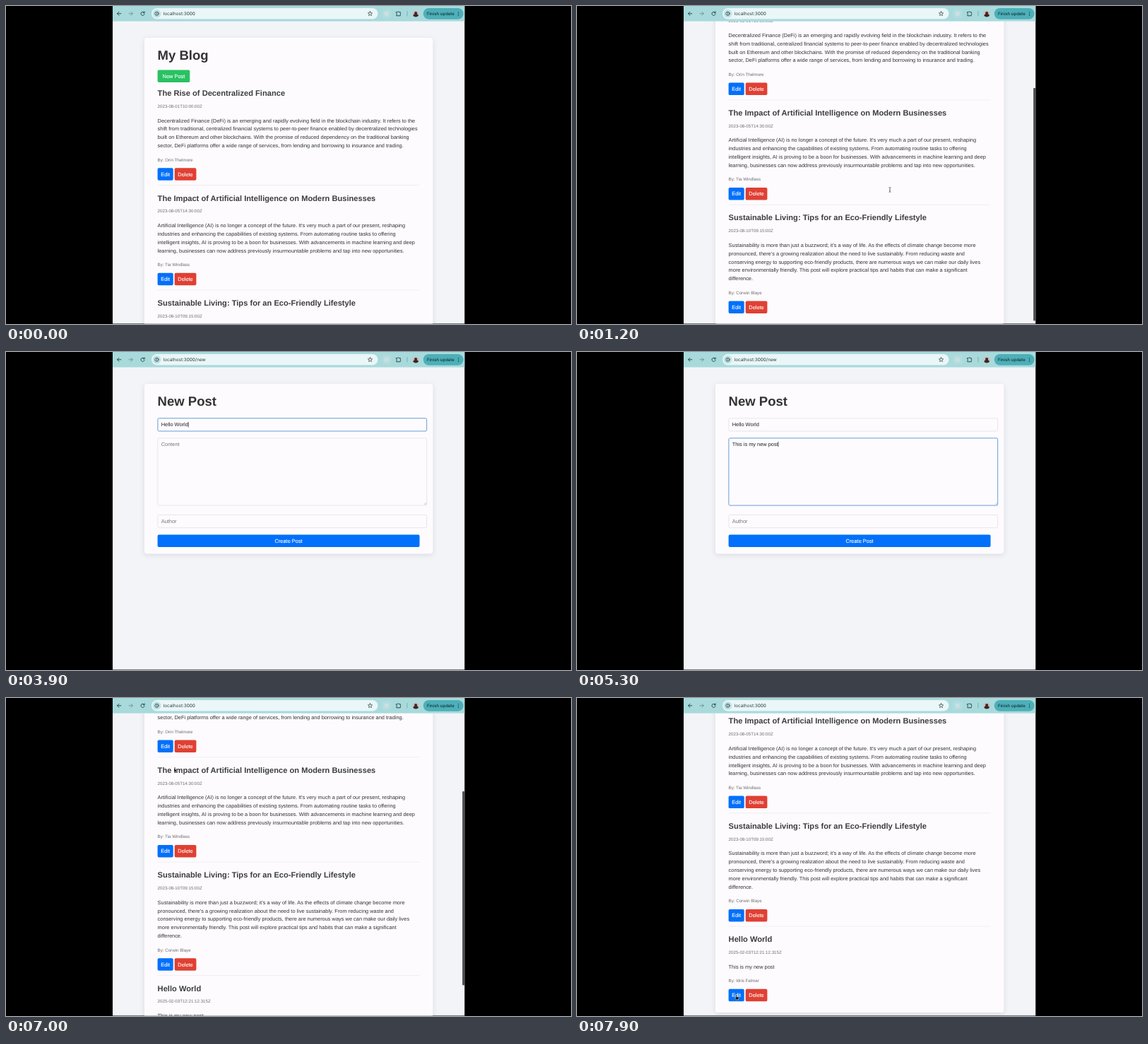
Write an HTML page that moves like this. It is 800 px wide and 450 px high and loops after 8 s.

```html
<!DOCTYPE html>
<html lang="en">
<head>
<meta charset="utf-8">
<title>My Blog</title>
<style>
  html, body { margin: 0; width: 100%; height: 100%; overflow: hidden; background: #000; }
  svg { display: block; width: 100vw; height: 100vh; text-rendering: geometricPrecision;
        font: 7.42px "Liberation Sans", Arial, sans-serif; fill: #333; }
  .ui { font-family: Inter, Roboto, sans-serif; }
  .h1 { font-size: 18.55px; font-weight: 700; }
  .h2 { font-size: 11.13px; font-weight: 700; fill: #3c3c3e; }
  .small { font-size: 6.18px; fill: #6c6c70; }
  .label { fill: #fff; stroke: #fff; stroke-width: .12; }
  .icon { fill: none; stroke: #25393c; stroke-width: .9; stroke-linecap: round; stroke-linejoin: round; }
  .field { fill: #fdfbfe; }
</style>
</head>
<body>
<svg viewBox="0 0 800 450" xmlns="http://www.w3.org/2000/svg">
  <defs>
    <clipPath id="view"><rect x="151" y="21.5" width="498.3" height="428"/></clipPath>
    <filter id="shadow" x="-10%" y="-10%" width="120%" height="120%">
      <feDropShadow dx="0" dy="1.8" stdDeviation="3.6" flood-opacity=".11"/>
    </filter>
  </defs>
  <rect width="800" height="450" fill="#000"/>
  <rect x="151" width="498.3" height="449.5" fill="#f3f4f8"/>
  <g clip-path="url(#view)">
    <g id="blog"></g>
    <g id="form"></g>
    <rect id="thumb" x="646.2" width="3" rx="1.2" fill="#4c4d50"/>
  </g>
  <g id="toolbar">
    <rect x="151" width="498.3" height="21.6" fill="#a8dadc"/>
    <rect x="206" y="3" width="320.5" height="15.6" rx="7.8" fill="#eaf6f7"/>
    <circle cx="213.5" cy="10.8" r="5.8" fill="#bfe2e5"/>
    <g class="icon">
      <path d="M162.8 10.8H157.6M160 8.3L157.5 10.8 160 13.3"/>
      <path d="M174 10.8H179.2M176.8 8.3L179.3 10.8 176.8 13.3" opacity=".45"/>
      <path d="M195.8 9.4A2.6 2.6 0 1 0 196.1 11.6M196.1 7.9V9.8H194.2"/>
      <circle cx="213.5" cy="10.8" r="2.6" stroke-width=".75"/>
      <path d="M213.5 10.7V12M213.5 9.4V9.5" stroke-width=".75"/>
      <path d="M515.6 7.7L516.5 9.7 518.7 9.9 517 11.4 517.5 13.6 515.6 12.4 513.7 13.6 514.2 11.4 512.5 9.9 514.7 9.7Z" stroke-width=".7"/>
      <path d="M552.9 8.6H554.6A1.1 1.1 0 0 1 556.7 8.6H558.3V10.2A1.1 1.1 0 0 1 558.3 12.2V13.8H552.9V12.1A1 1 0 0 0 552.9 10.2Z"/>
    </g>
    <rect x="532.5" y="4.6" width="12.8" height="12.6" rx="3" fill="#b2dcdf"/>
    <circle cx="538.8" cy="10.9" r="3.4" fill="#c9dfe1"/>
    <path d="M568 7V14.5" stroke="#6aa9ae" stroke-width=".8"/>
    <circle cx="580.2" cy="11" r="4.6" fill="#d3b9b8"/>
    <path d="M576.3 13.4A4.6 4.6 0 0 0 584.1 13.4Q583.4 11.5 581.8 11.3A2 2 0 1 0 578.6 11.3Q577 11.6 576.3 13.4Z" fill="#3b2628"/>
    <rect x="590.8" y="2.9" width="56.8" height="15.8" rx="7.9" fill="#4eafb8"/>
    <text class="ui" x="596" y="13" font-size="6.05" font-weight="500" fill="#0d3338">Finish update</text>
    <g fill="#0d3338"><circle cx="640.6" cy="8.6" r=".65"/><circle cx="640.6" cy="10.9" r=".65"/><circle cx="640.6" cy="13.2" r=".65"/></g>
    <text id="url" class="ui" x="222.7" y="13.1" font-size="6.4" fill="#2c3b3d"></text>
  </g>
  <g id="pointer">
    <path id="arrow" d="M0 0V6.2L1.5 4.9 2.5 7.1 3.4 6.7 2.5 4.6H4.4Z" fill="#000" stroke="#fff" stroke-width=".45"/>
    <path id="beam" d="M-1.4 -3.4Q0 -3.4 0 -2.4Q0 -3.4 1.4 -3.4M0 -2.6V2.6M-1.4 3.4Q0 3.4 0 2.4Q0 3.4 1.4 3.4M-.7 .9H.7" fill="none" stroke="#333" stroke-width=".65"/>
    <path id="hand" d="M-.6 .5Q0 -.3 .6 .5V3L3 3.5Q3.8 3.8 3.6 4.8L3 7.4H-.4L-2.2 4.7Q-1.8 3.8 -.6 4.7Z" fill="#111" stroke="#fff" stroke-width=".5"/>
  </g>
</svg>
<script>
const LOOP = 8000, LEFT = 214.6, LINE = 11.87, VIEW = 428;
const $ = id => document.getElementById(id);
const show = (el, on) => el.setAttribute("visibility", on ? "inherit" : "hidden");

const text = (x, y, s, cls = "") => `<text x="${x}" y="${y}" class="${cls}">${s}</text>`;
const button = (x, y, w, s, fill, id = "") =>
  `<rect id="${id}" x="${x}" y="${y}" width="${w}" height="17.5" rx="1.9" fill="${fill}"/>` +
  `<text x="${x + w / 2}" y="${y + 11.35}" text-anchor="middle" class="label">${s}</text>`;
const card = (id, h) =>
  `<rect id="${id}" x="196" y="45" width="408.2" height="${h}" rx="3.7" fill="#fdfbfe" filter="url(#shadow)"/>`;

const posts = [
  ["The Rise of Decentralized Finance", "2023-08-01T10:00:00Z", "Orin Thelmore", [
    "Decentralized Finance (DeFi) is an emerging and rapidly evolving field in the blockchain industry. It refers to the",
    "shift from traditional, centralized financial systems to peer-to-peer finance enabled by decentralized technologies",
    "built on Ethereum and other blockchains. With the promise of reduced dependency on the traditional banking",
    "sector, DeFi platforms offer a wide range of services, from lending and borrowing to insurance and trading."]],
  ["The Impact of Artificial Intelligence on Modern Businesses", "2023-08-05T14:30:00Z", "Tia Windlass", [
    "Artificial Intelligence (AI) is no longer a concept of the future. It's very much a part of our present, reshaping",
    "industries and enhancing the capabilities of existing systems. From automating routine tasks to offering",
    "intelligent insights, AI is proving to be a boon for businesses. With advancements in machine learning and deep",
    "learning, businesses can now address previously insurmountable problems and tap into new opportunities."]],
  ["Sustainable Living: Tips for an Eco-Friendly Lifestyle", "2023-08-10T09:15:00Z", "Corwin Blaye", [
    "Sustainability is more than just a buzzword; it's a way of life. As the effects of climate change become more",
    "pronounced, there's a growing realization about the need to live sustainably. From reducing waste and",
    "conserving energy to supporting eco-friendly products, there are numerous ways we can make our daily lives",
    "more environmentally friendly. This post will explore practical tips and habits that can make a significant",
    "difference."]],
  ["Hello World", "2025-02-03T12:21:12.315Z", "Idris Falmar", ["This is my new post"]]
];

// y is the vertical centre of the post's heading
function post([title, date, author, lines], y) {
  const end = y + 58.6 + lines.length * LINE;
  return text(LEFT, y + 4, title, "h2") + text(LEFT, y + 20.8, date, "small") +
    lines.map((s, i) => text(LEFT, y + 41.4 + i * LINE, s)).join("") +
    text(LEFT, end - 9.6, "By: " + author, "small") +
    button(LEFT, end, 22.1, "Edit", "#0270fa") + button(238.7, end, 30.7, "Delete", "#e04033");
}
const rule = y => `<path d="M${LEFT} ${y}H585.4" stroke="#ebe9ed" stroke-width=".7"/>`;

function buildBlog() {
  let y = 123.1, html = card("blogCard", 527) + text(LEFT, 75.6, "My Blog", "h1") +
    button(LEFT, 90.5, 45.7, "New Post", "#28c262", "newPost");
  posts.forEach((p, i) => {
    const entry = post(p, y);
    html += i < 3 ? entry : `<g id="added">${rule(y - 18.1)}${entry}</g>`;
    y += 101 + p[3].length * LINE;
    if (i < 2) html += rule(y - 18.1);
  });
  $("blog").innerHTML = html;
}

const fields = [
  { name: "Title", value: "Hello World", y: 93.8, h: 18.2, base: 105.4, focus: 2900, start: 3000, end: 3800 },
  { name: "Content", value: "This is my new post", y: 121.9, h: 95.2, base: 133.1, focus: 4100, start: 4200, end: 5200 },
  { name: "Author", value: posts[3][2], y: 230.5, h: 18.2, base: 242.2, focus: 5400, start: 5500, end: 6100 }
];
const SUBMIT_FOCUS = 6200;

function buildForm() {
  $("form").innerHTML = card("formCard", 240.3) + text(LEFT, 75.6, "New Post", "h1") +
    fields.map((f, i) => `<rect id="box${i}" class="field" x="214.9" y="${f.y}" width="380.8" height="${f.h}" rx="1.7"/>` +
      `<text id="value${i}" x="219.7" y="${f.base}"></text>`).join("") +
    `<path d="M592.3 216L595 213.3M594 216L595 215" stroke="#888" stroke-width=".5"/>` +
    `<rect id="ring" x="213.9" y="257.8" width="372.2" height="18.9" rx="2.4" fill="none" stroke="#5d9be0" stroke-width=".7"/>` +
    button(LEFT, 258.5, 371, "Create Post", "#0270fa") +
    `<rect id="caret" width=".6" height="7.6" fill="#111"/>`;
}

const ease = u => u * u * (3 - 2 * u);
// Eased interpolation through rows of [time, ...values]
function track(rows, t) {
  const i = rows.findIndex(r => r[0] > t);
  if (i === 0) return rows[0].slice(1);
  if (i < 0) return rows[rows.length - 1].slice(1);
  const a = rows[i - 1], b = rows[i], u = ease((t - a[0]) / (b[0] - a[0]));
  return a.slice(1).map((v, k) => v + (b[k + 1] - v) * u);
}

const scrollPath = [[0, 0], [800, 127.7], [1100, 127.7], [1800, 0], [6550, 0], [7250, 239.6], [7400, 239.6], [7600, 239.1]];
const pointerPath = [[1750, 443, 260], [2150, 189.6, 104.3], [2250, 189.6, 104.3], [2500, 238, 99],
  [7000, 238, 99], [7300, 280, 138.6], [7400, 280, 138.6], [7800, 225.5, 419.5]];
const OPEN_FORM = 2700, SAVED = 6400;

function drawForm(t) {
  show($("caret"), false);
  fields.forEach((f, i) => {
    const next = fields[i + 1] ? fields[i + 1].focus : SUBMIT_FOCUS;
    const focused = t >= f.focus && t < next;
    const typed = Math.max(0, Math.min(1, (t - f.start) / (f.end - f.start)));
    const value = f.value.slice(0, Math.round(typed * f.value.length));
    const label = $("value" + i), box = $("box" + i);
    label.textContent = value || f.name;
    label.setAttribute("fill", value ? "#222" : "#757578");
    box.setAttribute("stroke", focused ? "#5794cf" : "#d9d8dc");
    box.setAttribute("stroke-width", focused ? .9 : .6);
    if (focused) {
      $("caret").setAttribute("x", 219.7 + (value ? label.getComputedTextLength() : 0));
      $("caret").setAttribute("y", f.base - 6.4);
      show($("caret"), true);
    }
  });
  show($("ring"), t >= SUBMIT_FOCUS);
}

function drawPointer(t, onForm) {
  const [x, y] = track(pointerPath, t);
  const onButton = (t >= 2400 && t < OPEN_FORM) || t >= 7800;
  const onText = t < 1800 || onForm;
  $("pointer").setAttribute("transform", `translate(${x} ${y})`);
  show($("pointer"), (t >= 500 && t < 3000) || t >= 7000);
  show($("hand"), onButton);
  show($("beam"), onText);
  show($("arrow"), !onButton && !onText);
}

function draw(t) {
  const onForm = t >= OPEN_FORM && t < SAVED, saved = t >= SAVED;
  const [scroll] = track(scrollPath, t);
  show($("blog"), !onForm);
  show($("form"), onForm);
  show($("added"), saved);
  $("blog").setAttribute("transform", `translate(0 ${-scroll})`);
  $("blogCard").setAttribute("height", saved ? 639.2 : 526.7);
  const hover = (t >= 2400 && t < OPEN_FORM) || (saved && scroll < 9);
  $("newPost").setAttribute("fill", hover ? "#1fa153" : "#28c262");
  $("url").textContent = "localhost:3000" + (onForm ? "/new" : "");

  const page = VIEW + (saved ? 239.2 : 127.7), size = VIEW * VIEW / page;
  $("thumb").setAttribute("y", Math.min(450 - size, 21.5 + scroll * VIEW / page) + 1.5);
  $("thumb").setAttribute("height", size);
  show($("thumb"), (t >= 100 && t < 2200) || (t >= 6600 && t < 7800));

  if (onForm) drawForm(t);
  drawPointer(t, onForm);
}

buildBlog();
buildForm();
const began = performance.now();
function tick() {
  const t = (performance.now() - began) % LOOP;
  draw(Math.floor(t / 100) * 100);
  requestAnimationFrame(tick);
}
tick();
</script>
</body>
</html>
```
